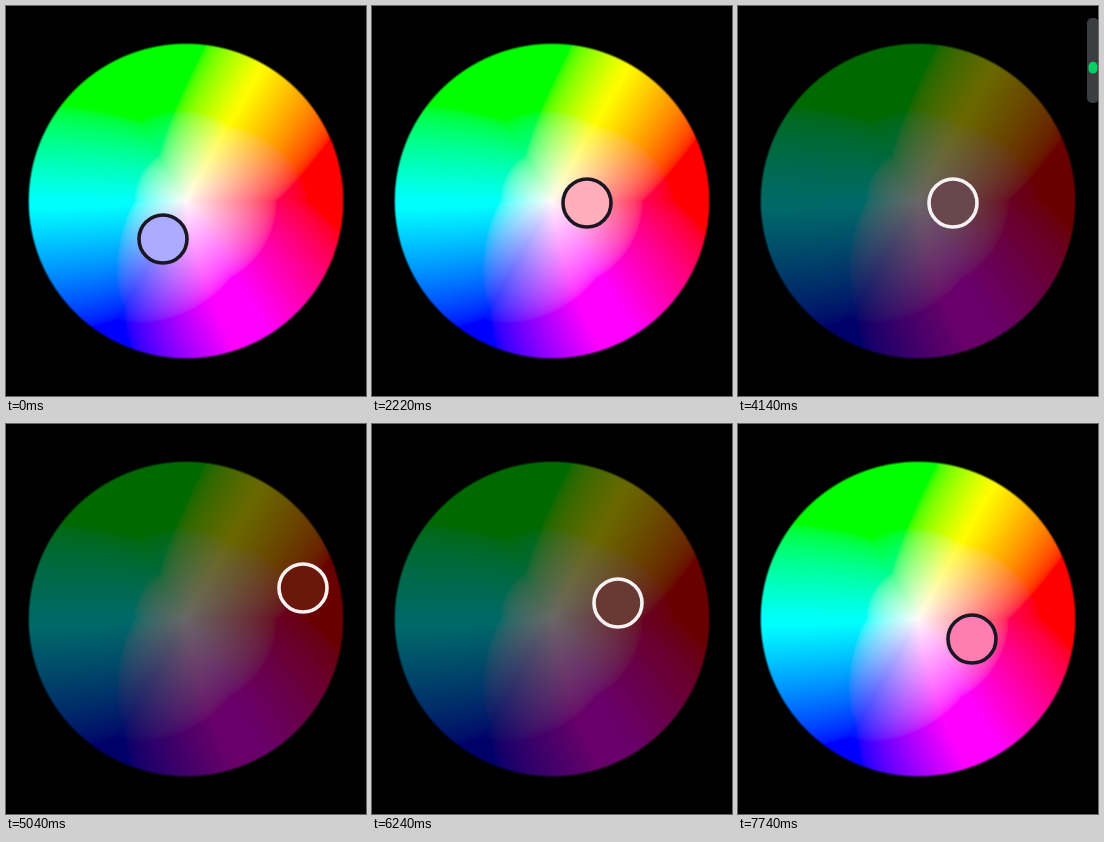
These frames come from a looping animation (360 by 390 pixels, 7.8 s). An HTML page with a canvas:

```html
<!DOCTYPE html>
<html lang="en">
<head>
<meta charset="utf-8">
<title>Colour wheel</title>
<style>
  html, body { margin: 0; height: 100%; overflow: hidden; background: #000; }
  canvas { display: block; }
</style>
</head>
<body>
<canvas id="stage" width="360" height="390"></canvas>
<script>
const W = 360, H = 390, CX = 180, CY = 195, R = 158;
const LOOP = 7800, STEP = 60, LAG = 120, GLIDE = 660, DIM = .59;
const ctx = document.getElementById('stage').getContext('2d');

// Where the ring comes to rest, with its time of arrival
const stops = [
  { at: 0, x: 157, y: 233 },
  { at: 1040, x: 217, y: 305 },
  { at: 2040, x: 215, y: 197 },
  { at: 5040, x: 297, y: 164 },
  { at: 6060, x: 246, y: 179 },
  { at: 7740, x: 234, y: 215 }
];

// Goes smoothly from 0 to 1 between two times
function ease(t, from, to) {
  const u = Math.max(0, Math.min(1, (t - from) / (to - from)));
  return u * u * (3 - 2 * u);
}

const brightness = t => 1 - DIM * (ease(t, 2800, 4080) - ease(t, 6540, 7140));
const sliderShown = t => ease(t, 2640, 2800) - ease(t, 4320, 4500)
  + ease(t, 6360, 6540) - ease(t, 7260, 7440);

function ringAt(t) {
  return stops.reduce((p, s) => {
    const k = ease(t, s.at - GLIDE, s.at);
    return { x: p.x + (s.x - p.x) * k, y: p.y + (s.y - p.y) * k };
  }, stops[0]);
}

const linear = v => v ** 2.2;
const encode = v => Math.max(0, Math.min(1, v)) ** (1 / 2.2);

// HSV wheel in a wide gamut, clipped to the screen's
function wheelColor(x, y) {
  const dx = x - CX, dy = CY - y;
  const sat = Math.min(1, Math.hypot(dx, dy) / R) ** .9;
  const hue = (Math.atan2(dy, dx) / Math.PI * 3 + 6) % 6;
  const [r, g, b] = [5, 3, 1].map(n => {
    const k = (n + hue) % 6;
    return linear(1 - sat * Math.max(0, Math.min(k, 4 - k, 1)));
  });
  return [
    1.62 * r - .57 * g - .03 * b,
    1.11 * g - .14 * r - .01 * b,
    1.1 * b - .13 * g - .03 * r
  ].map(v => 255 * encode(v));
}

function makeWheel() {
  const canvas = document.createElement('canvas');
  canvas.width = W;
  canvas.height = H;
  const c = canvas.getContext('2d'), image = c.createImageData(W, H);
  for (let y = 0; y < H; y++) {
    for (let x = 0; x < W; x++) {
      const px = x + .5, py = y + .5;
      const cover = (R + .5 - Math.hypot(px - CX, py - CY)) / 2.5;
      if (cover > 0) {
        image.data.set([...wheelColor(px, py), 255 * Math.min(1, cover)], (y * W + x) * 4);
      }
    }
  }
  c.putImageData(image, 0, 0);
  return canvas;
}
const wheel = makeWheel();

function pill(x, y, w, h, r, color) {
  ctx.fillStyle = color;
  ctx.beginPath();
  ctx.roundRect(x, y, w, h, r);
  ctx.fill();
}

// The fill trails a little behind the ring's position
function drawRing(t, light) {
  const ring = ringAt(t), picked = ringAt(t - LAG);
  const rgb = wheelColor(picked.x, picked.y).map(v => v * light);
  const luma = .3 * rgb[0] + .59 * rgb[1] + .11 * rgb[2];
  ctx.beginPath();
  ctx.arc(ring.x, ring.y, 24, 0, 7);
  ctx.fillStyle = `rgb(${rgb.map(Math.round)})`;
  ctx.fill();
  ctx.lineWidth = 3.6;
  ctx.strokeStyle = luma > 130 ? '#1a1722' : '#f6f1f3';
  ctx.stroke();
}

function draw(t) {
  const light = brightness(t), left = 363 - 14 * sliderShown(t);
  ctx.fillStyle = '#000';
  ctx.fillRect(0, 0, W, H);
  ctx.globalAlpha = light;
  ctx.drawImage(wheel, 0, 0);
  ctx.globalAlpha = 1;
  drawRing(t, light);
  pill(left, 12, 12, 85, 5, '#3b3d40');
  pill(left + 1.5, 12 + 74 * (1 - light), 9, 12, 4.5, '#05cf62');
}

const start = performance.now();
function frame() {
  const t = (performance.now() - start) % LOOP;
  draw(Math.floor(t / STEP) * STEP);
  requestAnimationFrame(frame);
}
frame();
</script>
</body>
</html>
```
